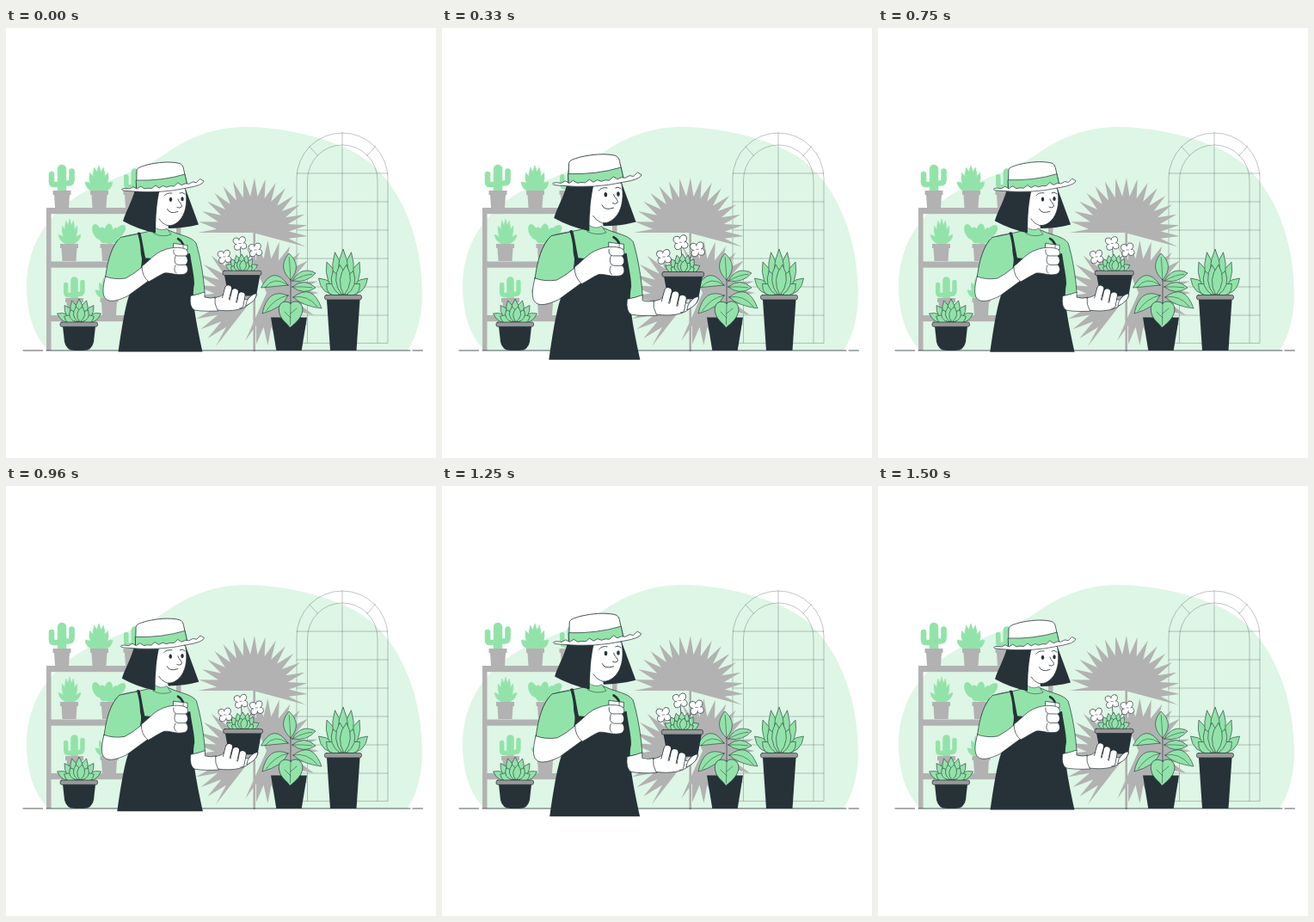
These frames come from a looping animation (500 px wide and 500 px high, 1540 ms). An HTML page with a canvas:

```html
<!DOCTYPE html>
<html lang="en">
<head>
<meta charset="utf-8">
<title>Gardener</title>
<style>
html, body { margin: 0; width: 100%; height: 100%; overflow: hidden; background: #fff; }
canvas { display: block; width: 500px; height: 500px; }
</style>
</head>
<body>
<canvas id="stage" width="500" height="500"></canvas>
<script>
const ctx = document.getElementById('stage').getContext('2d');
const GREEN = '#92e3a9', PALE = '#def6e5', DARK = '#263238', GRAY = '#b2b2b2', RIM = '#999', WHITE = '#fff';
const LOOP = 1540, FIRST_PEAK = 372, TROUGH = 835, SECOND_PEAK = 1172, REST = 1520;

function shape(d, fill, stroke, width = .7) {
  const path = new Path2D(d);
  if (fill) { ctx.fillStyle = fill; ctx.fill(path); }
  if (stroke) { ctx.strokeStyle = stroke; ctx.lineWidth = width; ctx.stroke(path); }
}

const line = (d, color = DARK, width = .7) => shape(d, null, color, width);

function oval(x, y, rx, ry, angle, fill, stroke) {
  ctx.beginPath();
  ctx.ellipse(x, y, rx, ry, angle, 0, 7);
  ctx.fillStyle = fill;
  ctx.fill();
  if (stroke) { ctx.strokeStyle = stroke; ctx.lineWidth = .7; ctx.stroke(); }
}

// Pointed leaf from base to tip; bend lifts its middle
function leaf(x0, y0, x1, y1, w, stroke = DARK, bend = 0) {
  const mx = (x0 + x1) / 2, my = (y0 + y1) / 2 - bend;
  const len = Math.hypot(x1 - x0, y1 - y0);
  const nx = (y0 - y1) / len * w, ny = (x1 - x0) / len * w;
  shape(`M${x0} ${y0}Q${mx + nx} ${my + ny} ${x1} ${y1}Q${mx - nx} ${my - ny} ${x0} ${y0}Z`, GREEN, stroke, .6);
}

function veinedLeaf(x0, y0, x1, y1, w, bend) {
  leaf(x0, y0, x1, y1, w, DARK, bend);
  line(`M${x0} ${y0}Q${(x0 + x1) / 2} ${(y0 + y1) / 2 - bend} ${x0 * .15 + x1 * .85} ${y0 * .15 + y1 * .85}`, DARK, .5);
}

// Two rows of leaves, each drawn from the sides to the middle
function tuft(x, y, spread, height, w, stroke = DARK) {
  for (const [reach, side] of [[1, 3], [.68, 2.5]]) {
    for (let i = side; i >= 0; i--) {
      for (const a of i ? [-i / side, i / side] : [0]) {
        const dx = spread * a * reach;
        leaf(x + dx * .25, y, x + dx, y - height * reach * (1 - .63 * a * a), w, stroke);
      }
    }
  }
}

function shelfPot(x, y, w = 21) {
  const h = w / 2;
  shape(`M${x - h} ${y}h${w}v5h-1.5l-1 15h${5 - w}l-1 -15h-1.5Z`, GRAY);
}

function cactus(x, y, k) {
  line(`M${x} ${y}V${y - 25 * k}`, GREEN, 10.5 * k);
  line(`M${x - 12 * k} ${y - 19 * k}v9q0 3 3 3H${x}`, GREEN, 6.6 * k);
  line(`M${x + 11.5 * k} ${y - 22.5 * k}v10q0 4 -4 4H${x}`, GREEN, 6.6 * k);
}

function fan(x, y, from, to, count, outer, inner) {
  const step = (to - from) / (count - 1);
  const at = (deg, r) => {
    const a = deg * Math.PI / 180;
    return `L${x + r * Math.cos(a)} ${y + r * Math.sin(a)}`;
  };
  let d = `M${x} ${y}`;
  for (let i = 0; i < count; i++) {
    const a = from + i * step;
    d += at(a, outer);
    if (i < count - 1) d += at(a + step / 2, inner);
  }
  shape(d + 'Z', GRAY);
}

function taperedPot(left, right, top, bottom, inset) {
  shape(`M${left} ${top}H${right}L${right - inset} ${bottom}H${left + inset}Z`, DARK);
}

function potRim(x, y, w) {
  ctx.beginPath();
  ctx.roundRect(x, y, w, 5.3, 2);
  ctx.fillStyle = RIM;
  ctx.fill();
  ctx.strokeStyle = DARK;
  ctx.lineWidth = .7;
  ctx.stroke();
}

function drawWindow() {
  const c = 'rgba(38,50,56,.36)';
  line('M338 366V175A53 53 0 0 1 444 175V366Z', c, .8);
  line('M350.5 366V177A40.75 41 0 0 1 432 177V366M391 122V366M353 138l9.5 10.5M429.5 137.5L420 148.5', c, .8);
  for (let y = 169; y < 340; y += 33) line(`M338 ${y}H444`, c, .8);
}

function drawShelf() {
  ctx.fillStyle = GRAY;
  ctx.fillRect(47, 209, 5.5, 166);
  ctx.fillRect(198, 209, 5.5, 166);
  for (let row = 0; row < 3; row++) ctx.fillRect(47, 209 + row * 62.5, 156, 7.2);

  cactus(65, 189, 1);
  shelfPot(65, 189);
  tuft(108, 190, 16, 30, 7, GREEN);
  shelfPot(108.5, 189);
  cactus(150, 189, .85);
  shelfPot(149, 189, 25);

  tuft(74, 251, 13, 29, 5, GREEN);
  shelfPot(73.5, 251);
  for (let i = 0; i < 5; i++) oval(106 + i * 6.5, 237 + i % 2 * 4, 5, 9.5, -.4 + i * .28, GREEN);
  oval(121, 246, 9, 5, 0, GREEN);
  shelfPot(120, 251);

  cactus(79.5, 314, .82);
  shelfPot(79.5, 314);
  tuft(118, 314, 14, 25, 6, GREEN);
  shelfPot(120, 314);
}

function drawPalm() {
  line('M288.7 236V375', '#aaa', 2.4);
  fan(287, 238, 180, 375, 18, 64, 42);
  fan(287, 315, 128, 237, 11, 70, 45);
  fan(303, 308, 246, 474, 19, 61, 40);
}

function drawFloorPlants() {
  tuft(85, 342, 25.5, 27, 9);
  shape('M66 347H104L102 365Q100 375 90 375H80Q70 375 68 365Z', DARK);
  potRim(63, 342, 43.5);

  tuft(392, 311, 28.5, 54, 12);
  taperedPot(373, 411.5, 316, 375, 4);
  potRim(370.5, 310.5, 43);

  taperedPot(308, 350, 336.5, 375, 6.3);
  line('M331 290V325');
  veinedLeaf(331, 293, 329, 262, 15, 0);
  veinedLeaf(333, 294, 360, 285, 11, 3);
  veinedLeaf(328, 299, 296.5, 302, 13, 13);
  veinedLeaf(333, 301, 360, 302, 11, 1);
  veinedLeaf(334, 313, 367, 326, 15, 10);
  veinedLeaf(328, 311, 298, 332, 15, 8);
  shape('M331 320C322 315 315 321 318 332C320 340 327 343 330 348.5C337 343 344 337 345 328C345 319 337 315 331 320Z', GREEN, DARK);
  line('M331 320L330.5 345M331 332l7 -6M331 337l-7 -7', DARK, .5);
}

function drawBackground() {
  shape('M50 375C31 358 24 328 24 300C24 250 52 212 92 190C130 172 160 165 190 143C222 122 252 114 284 115C320 116 365 125 400 142C455 168 484 240 484 308C484 335 478 358 467 375Z', PALE);
  drawWindow();
  drawShelf();
  drawPalm();
  line('M20 375H42.5M47 375H470M473 375H484.5', DARK, .8);
  drawFloorPlants();
}

function flower(x, y) {
  for (let i = 0; i < 4; i++) {
    const a = i * Math.PI / 2 + .6;
    oval(x + 4.6 * Math.cos(a), y + 4.6 * Math.sin(a), 4.3, 3.7, a, WHITE, DARK);
  }
  oval(x, y, 3.6, 3.6, 0, WHITE);
  line(`M${x - 1.2} ${y}h2.4`, DARK, .5);
}

function drawBody() {
  // Shirt and right sleeve
  shape('M173 234L189 235C204 242 215 242 221 250C226 266 230 290 231 308L214 312L212 330H145L152 285L116 290C119 268 124 251 133 244C146 239 162 239 173 234Z', GREEN, DARK);
  // Neck and collar
  shape('M176 218L174.5 237Q183 241 188 238L187 226Z', WHITE);
  shape('M173.5 232Q181 237 187 233L192 240Q182 244 172 239Z', GREEN, DARK, .5);
  // Apron
  line('M154.5 239.5C157 250 158 260 161 272', DARK, 4.2);
  line('M200 245Q204 247 206 252', DARK, 2.5);
  shape('M158 267C172 269 194 267 214 262C216 277 219 288 219 298C215 314 222 346 228.5 376.5H130.5C134 352 138 326 143 311C150 297 158 285 158 267Z', DARK);
}

function drawLeftArm() {
  shape('M133 243.5C123 253 118 270 115.5 290Q132 297 146 288C156 278 160 262 153 239Z', GREEN);
  line('M153 239.5L133 243.5C123 253 118 270 115.5 290');
  shape('M115.5 289C113 299 112 307 114 312C118 321 130 317 141 312L167 293L158 278Q149 286 139 291Q126 293 115.5 289Z', WHITE, DARK);
  // Small jar in the fist
  shape('M195 250.5L211 252.5V258L195 258Z', WHITE, DARK);
  line('M206 251.8V257', DARK, .6);
  shape('M158 277C167 271 172 262 184 258C194 254 207 255 210 258C212 261 212 264 209 265C212 268 212 273 209 275C213 279 212 286 206 286.5C198 288 190 284 184 285C177 288 172 292 166 295Q158 289 158 277Z', WHITE, DARK);
  line('M195 258Q194 264 199 265H209M197 265Q194 274 200 275.5H209M197 276Q194 282 198 285');
}

function drawRightArm() {
  shape('M214.5 311.5Q223 310 231 307V313Q238 315 244 313L247 329Q230 330 219 328Q213 325 214.5 311.5Z', WHITE, DARK);
  shape('M243 314C247 312 250 313 253 309L266 313L280 316C284 312 288 309 291.5 309C291 316 285 319 281 322C275 328 261 330 246 328Q242 321 243 314Z', WHITE, DARK);
}

function finger(x, y, slant, length) {
  const d = `M${x} ${y}l${-slant} ${length}`;
  line(d, DARK, 8.6);
  line(d, WHITE, 7.2);
}

function drawHeldPot() {
  line('M271 280Q260 273 255 267M273 280Q274 266 272 252M276 280Q280 268 289 259');
  tuft(274, 283, 18.5, 20, 8);
  flower(254, 266);
  flower(272, 250.5);
  flower(290, 258);
  taperedPot(254, 295.5, 287, 311.5, 4.5);
  potRim(252, 282.2, 45);
  shape('M280 318C283 312 288 308.5 291.5 309C290 317 285 320 279 323Z', WHITE, DARK);
  for (let i = 2; i >= 0; i--) finger(258.5 + i * 7.8, 303 + i * 4, 4 - i, 15 - i * 2);
  shape('M247 314L253 314L270 320L275 322L271 326Q258 329 248 327Z', WHITE);
}

function drawHead() {
  shape('M208 185L224 228.5Q207 233 189 233L187 220Z', DARK);
  shape('M178 187H208.5C211 200 210 212 204 221C198 229 191 231 186 229L175 233V208Z', WHITE);
  line('M208.5 187C211 200 210 212 204 221C198 229 191 231 186 229Q181 227 178 222');
  shape('M150 188C146 203 139 214 136 224.5Q153 234 174 238.5C174 220 175 204 179 187Z', DARK);
  oval(191.5, 199.3, 1.7, 2.6, 0, DARK);
  oval(205, 198.7, 1.7, 2.6, 0, DARK);
  line('M184 195Q187 191 193 192M202 192Q205 190 208 193M200 199C201 203 206 206 204 208Q202 210 199 208.5M187.5 210.5Q190 217 200 213.5', DARK, .8);
}

function drawHat() {
  shape('M151.5 187L152 166C152 162 158 161 164 159C177 156 190 155 200 157C206 158 206 162 207 166L211 184Z', WHITE, DARK, .8);
  shape('M151.5 177Q181 178 208 170L211 184Q181 191 152 189Z', GREEN, DARK);
  // Brim with a frayed upper edge
  let brim = 'M135 187Q132 189 142 189.5Q180 193 210 186Q229 183 230 178';
  const frays = 22;
  for (let i = 1; i < frays; i++) {
    const p = i / frays;
    const notch = i % 2 ? 2 + 1.5 * Math.sin(i * 2) : 0;
    brim += `L${230 - 95 * p} ${178 + 9 * p + 3 * Math.sin(Math.PI * p) - notch}`;
  }
  shape(brim + 'Z', WHITE, DARK);
}

function drawWoman(swell) {
  const scale = (1 + .1 * swell) / 1.006;
  ctx.save();
  ctx.translate(205.5, 266);
  ctx.scale(scale, scale);
  ctx.translate(-205.5, -266);
  drawBody();
  drawRightArm();
  drawHeldPot();
  drawHead();
  drawHat();
  drawLeftArm();
  ctx.restore();
}

// Two beats: sharp at the peaks, softened around the trough between them
function swellAt(t) {
  const ramp = (from, to) => (t - from) / (to - from);
  if (t < FIRST_PEAK) return ramp(REST - LOOP, FIRST_PEAK);
  if (t < TROUGH) return ramp(TROUGH, FIRST_PEAK) ** 1.4;
  if (t < SECOND_PEAK) return ramp(TROUGH, SECOND_PEAK) ** 1.5;
  if (t < REST) return ramp(REST, SECOND_PEAK);
  return ramp(REST, FIRST_PEAK + LOOP);
}

ctx.lineCap = ctx.lineJoin = 'round';
const start = performance.now();

function frame() {
  ctx.fillStyle = WHITE;
  ctx.fillRect(0, 0, 500, 500);
  drawBackground();
  drawWoman(swellAt((performance.now() - start) % LOOP));
  requestAnimationFrame(frame);
}
frame();
</script>
</body>
</html>
```
